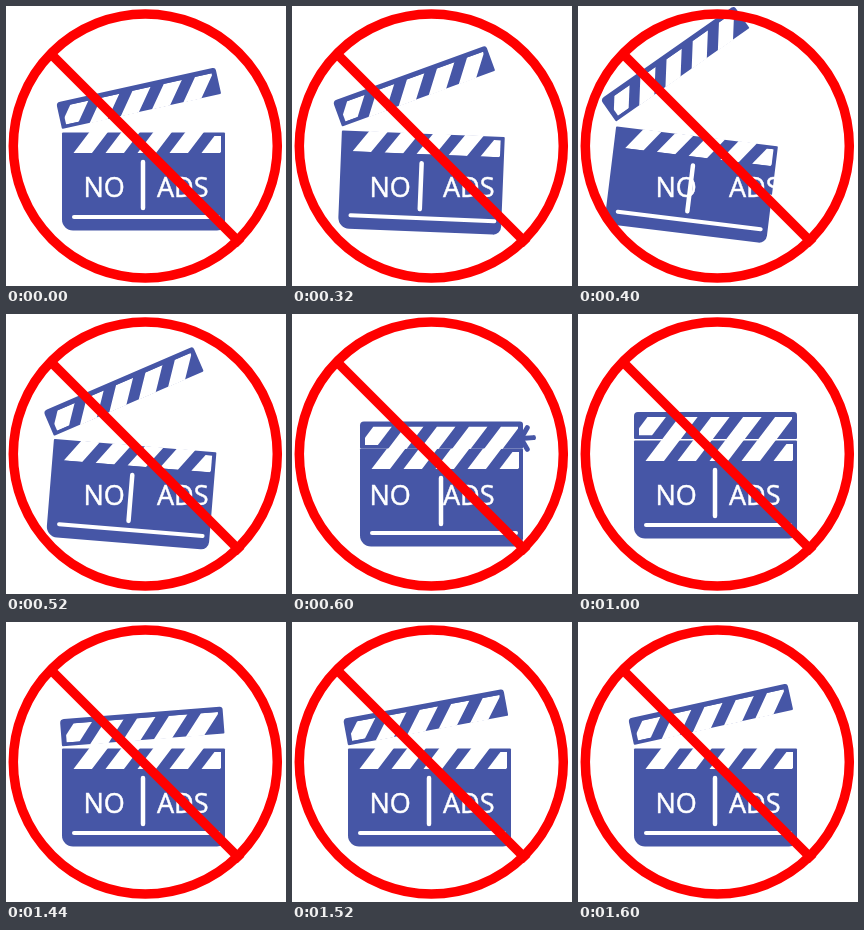
An HTML page with a canvas for the animation above (1.64 s loop, 280 by 280 pixels).

```html
<!DOCTYPE html>
<html lang="en">
<head>
<meta charset="utf-8">
<title>No ads</title>
<style>
  html, body { margin: 0; width: 100%; height: 100%; overflow: hidden; background: #fff; }
  canvas { display: block; width: 280px; height: 280px; }
</style>
</head>
<body>
<canvas id="stage" width="280" height="280"></canvas>
<script>
const ctx = document.getElementById('stage').getContext('2d');
const LOOP = 1640, STEP = 40;
const BLUE = '#4656a6', RED = '#ff0000', WHITE = '#ffffff';
const BOARD_WIDTH = 163;
const BAR_WIDTH = 18.5, BAR_PERIOD = 32, BAR_SLANT = 0.76;

// Each key: time, then the values that run linearly between keys.
const boardKeys = [ // x shift, y shift, tilt in degrees
  [280, 0, 0, 0], [400, -24.5, 3.5, 7], [480, -24.5, 3.5, 7],
  [600, 12, 8, 0], [720, 0, 0, 0]
];
const armKeys = [ // hinge x, hinge y, angle in degrees
  [280, 56, 123, -12.5], [400, 38, 115.5, -35], [480, 38, 115.5, -35],
  [600, 68, 134.5, 0], [720, 56, 125, 0]
];
const sparkKeys = [ // inner and outer radius
  [600, 0, 12.5], [720, 20, 52], [800, 20, 54], [960, 42, 58]
];

function valuesAt(keys, time) {
  if (time <= keys[0][0]) return keys[0].slice(1);
  for (let i = 1; i < keys.length; i++) {
    const a = keys[i - 1], b = keys[i];
    if (time <= b[0]) {
      const k = (time - a[0]) / (b[0] - a[0]);
      return a.slice(1).map((v, j) => v + (b[j + 1] - v) * k);
    }
  }
  return keys[keys.length - 1].slice(1);
}

const radians = degrees => degrees * Math.PI / 180;

function line(x1, y1, x2, y2, width, color, cap = 'round') {
  ctx.lineWidth = width;
  ctx.strokeStyle = color;
  ctx.lineCap = cap;
  ctx.beginPath();
  ctx.moveTo(x1, y1);
  ctx.lineTo(x2, y2);
  ctx.stroke();
}

function panel(x, y, width, height, radii) {
  ctx.fillStyle = BLUE;
  ctx.beginPath();
  ctx.roundRect(x, y, width, height, radii);
  ctx.fill();
}

// Slanted white bars kept between two side margins; x is the first lower left corner.
function bars(x, count, top, bottom, left, right) {
  const shift = (bottom - top) * BAR_SLANT;
  ctx.save();
  ctx.beginPath();
  ctx.rect(left, top, right - left, bottom - top);
  ctx.clip();
  ctx.fillStyle = WHITE;
  ctx.beginPath();
  for (let i = 0; i < count; i++, x += BAR_PERIOD) {
    ctx.moveTo(x, bottom);
    ctx.lineTo(x + shift, top);
    ctx.lineTo(x + shift + BAR_WIDTH, top);
    ctx.lineTo(x + BAR_WIDTH, bottom);
  }
  ctx.fill();
  ctx.restore();
}

function drawBoard(time) {
  const [dx, dy, tilt] = valuesAt(boardKeys, time);
  ctx.save();
  ctx.translate(137.5 + dx, 176 + dy);
  ctx.rotate(radians(tilt));
  ctx.translate(-137.5, -176);
  panel(56, 126.5, BOARD_WIDTH, 98, [1, 1, 8, 11]);
  bars(67.5, 4, 126, 147, 60, 215);
  bars(67.5 + 4 * BAR_PERIOD, 1, 130, 147, 60, 215);
  line(137, 156, 137, 202, 4.5, WHITE);
  line(68, 211, 212, 211, 4, WHITE);
  ctx.restore();
}

function armPose(time) {
  if (time <= 1400) return valuesAt(armKeys, time);
  const left = 1 - Math.min(1, (time - 1400) / 200);
  const open = 1 - left * left;
  return [56, 125 - 2 * open, -12.5 * open];
}

function drawArm(time) {
  const [x, y, angle] = armPose(time);
  ctx.save();
  ctx.translate(x, y);
  ctx.rotate(radians(angle));
  panel(0, -27, BOARD_WIDTH, 27, [4, 3, 1, 1]);
  bars(-0.6, 1, -22, -3.5, 5, 158);
  bars(28, 4, -22, 0.5, 5, 158);
  ctx.restore();
}

function drawSparks(time) {
  if (time < 600 || time >= 1000) return;
  const [dx] = valuesAt(boardKeys, time);
  const [inner, outer] = valuesAt(sparkKeys, time);
  const x = 217 + dx, y = 124.5;
  for (const degrees of [-60, -4, 60]) {
    const c = Math.cos(radians(degrees)), s = Math.sin(radians(degrees));
    line(x + c * inner, y + s * inner, x + c * outer, y + s * outer, 5, BLUE);
  }
}

function drawLabel() {
  ctx.fillStyle = ctx.strokeStyle = WHITE;
  ctx.lineWidth = 0.5;
  ctx.font = '27px "Open Sans", "Noto Sans", sans-serif';
  for (const [word, x] of [['NO', 77.5], ['ADS', 151]]) {
    ctx.fillText(word, x, 190.5);
    ctx.strokeText(word, x, 190.5);
  }
}

function drawBan() {
  ctx.strokeStyle = RED;
  ctx.lineWidth = 9.5;
  ctx.beginPath();
  ctx.arc(139.3, 140, 132, 0, 2 * Math.PI);
  ctx.stroke();
  line(44, 47, 235, 238, 9.5, RED, 'butt');
}

function render(now) {
  const time = Math.floor((now % LOOP) / STEP) * STEP;
  ctx.fillStyle = WHITE;
  ctx.fillRect(0, 0, 280, 280);
  drawBoard(time);
  drawArm(time);
  drawSparks(time);
  drawLabel();
  drawBan();
}

const start = performance.now();
function tick() {
  render(performance.now() - start);
  requestAnimationFrame(tick);
}
tick();
</script>
</body>
</html>
```
